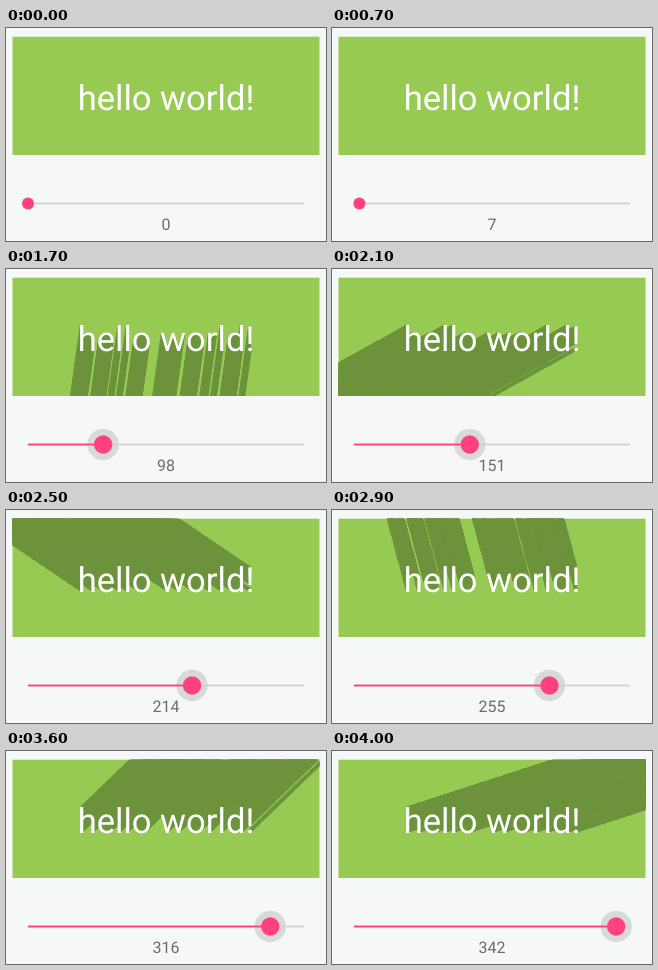
These frames come from a looping animation (320x213 px, 4.1 s). An HTML page with a canvas:

```html
<!DOCTYPE html>
<html lang="en">
<head>
<meta charset="utf-8">
<title>Long shadow angle</title>
<style>
  html, body { margin: 0; width: 100%; height: 100%; overflow: hidden; background: #f6f8f7; }
  canvas { display: block; }
</style>
</head>
<body>
<canvas id="stage" width="320" height="213"></canvas>
<script>
const ctx = document.getElementById('stage').getContext('2d');
const LOOP = 4100, STEP = 100, PRESS = 800;
const PINK = '#ff4081';
const TRACK = { left: 22, right: 298, y: 175.5 };

// [time in ms, slider angle in degrees]
const KEYS = [[0, 0], [300, 0], [700, 7], [1300, 45], [2100, 151], [2500, 214], [3300, 296], [4000, 342]];

function angleAt(t) {
  const i = KEYS.findIndex(key => key[0] > t);
  if (i < 0) return KEYS[KEYS.length - 1][1];
  const [t0, a0] = KEYS[i - 1], [t1, a1] = KEYS[i];
  return Math.round(a0 + (a1 - a0) * (t - t0) / (t1 - t0));
}

function rect(x, y, w, h, color) {
  ctx.fillStyle = color;
  ctx.fillRect(x, y, w, h);
}

function disc(x, r, color) {
  ctx.fillStyle = color;
  ctx.beginPath();
  ctx.arc(x, TRACK.y, r, 0, 2 * Math.PI);
  ctx.fill();
}

function label(text, x, y, size, color) {
  ctx.font = size + 'px Roboto, sans-serif';
  ctx.fillStyle = color;
  ctx.fillText(text, x, y);
}

function title(dx, dy, color) {
  label('hello world!', 160 + dx, 81.5 + dy, 34.6, color);
}

// Sweep the title along the angle, clipped to the panel
function longShadow(degrees) {
  const a = degrees * Math.PI / 180;
  ctx.save();
  ctx.beginPath();
  ctx.rect(6.5, 8.7, 307, 118.3);
  ctx.clip();
  for (let d = 1; d < 330; d++) title(d * Math.cos(a), d * Math.sin(a), '#6d933d');
  ctx.restore();
}

function draw(t) {
  const angle = angleAt(t), pressed = t >= PRESS;
  const { left, right, y } = TRACK;
  const x = left + (right - left) * angle / 360;

  rect(0, 0, 320, 213, '#f6f8f7');
  rect(6.5, 8.7, 307, 118.3, '#97ca53');
  if (pressed) longShadow(angle);
  title(0, 0, '#fff');

  if (pressed) disc(x, 15.7, '#d8dad9');
  rect(left, y - 0.9, right - left, 1.8, '#d0d2d1');
  rect(left, y - 0.9, x - left, 1.8, PINK);
  disc(x, pressed ? 9.2 : 6, PINK);
  label(angle, 160, 201.7, 16, '#6b6d6c');
}

ctx.textAlign = 'center';
ctx.textRendering = 'geometricPrecision';
const start = performance.now();
let shown = -1;

function frame() {
  const t = Math.floor((performance.now() - start) % LOOP / STEP) * STEP;
  if (t !== shown) draw(shown = t);
  requestAnimationFrame(frame);
}
frame();
</script>
</body>
</html>
```
